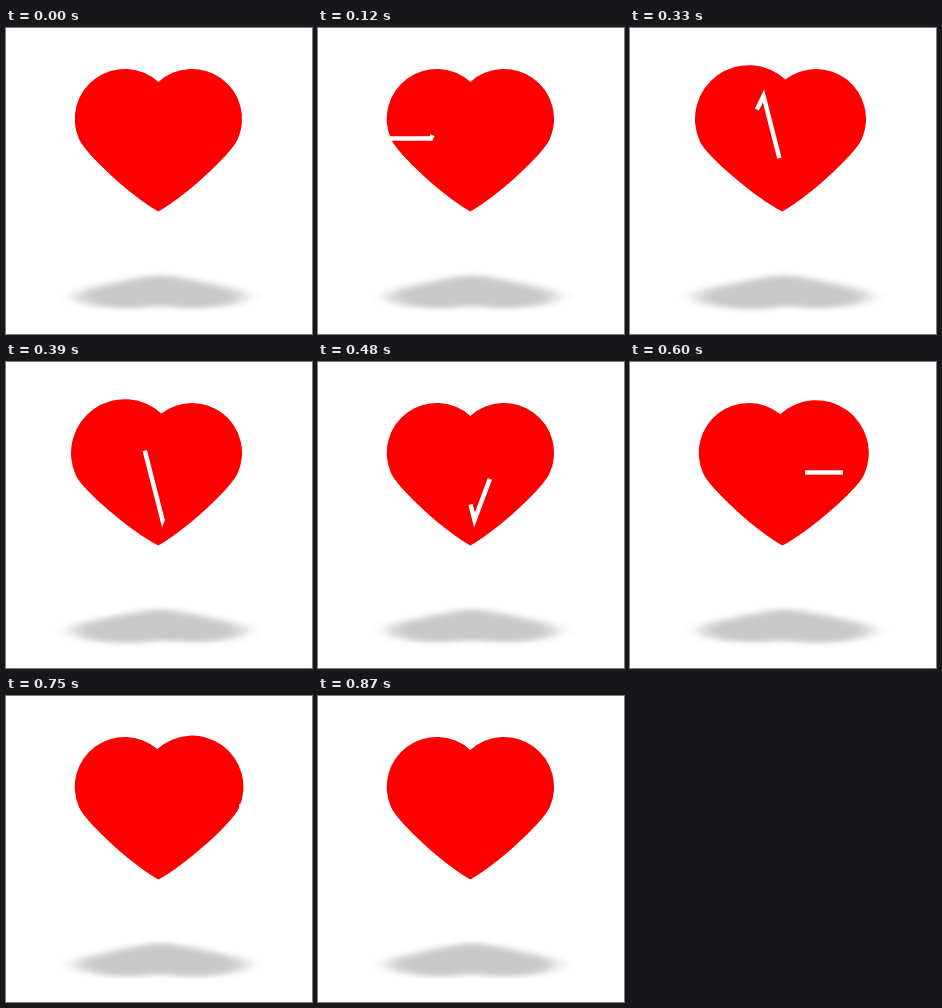
Recreate the animation shown at these times as an HTML page. Size 306x306 px, loop 0.9 s.

```html
<!DOCTYPE html>
<html lang="en">
<head>
<meta charset="utf-8">
<title>Heartbeat</title>
<style>
  html, body { margin: 0; width: 100%; height: 100%; overflow: hidden; background: #fff; }
  svg { display: block; width: 100%; height: 100%; }
</style>
</head>
<body>
<svg viewBox="0 0 306 306">
  <defs>
    <path id="heart"/>
    <filter id="soft" filterUnits="userSpaceOnUse" x="0" y="220" width="306" height="86" color-interpolation-filters="sRGB">
      <feGaussianBlur stdDeviation="10 2.5"/>
    </filter>
  </defs>
  <g filter="url(#soft)">
    <use href="#heart" fill="#c8c8c8" transform="translate(2 290) scale(1 -.237)"/>
  </g>
  <use href="#heart" fill="#f00"/>
  <path id="trace" fill="none" stroke="#fff" stroke-width="4.5" stroke-miterlimit="10"
        d="M53 110.4H113L133.5 68L156.5 158L174.3 110.4H260"/>
</svg>
<script>
  const LOOP = 900, STEP = 30;
  const heart = document.getElementById('heart');
  const trace = document.getElementById('trace');

  // Sine ease around a midpoint: distance along the trace at time t
  const glide = (t, mid, span, centre, reach) =>
    Math.max(0, centre + reach * Math.sin(Math.PI * (t - mid) / span));
  const tail = t => glide(t, 420, 900, 147, 178);
  const head = t => glide(t, 270, 1120, 140, 187);

  // Lobe radius: swells and shrinks back at a steady rate
  const lobe = (t, peak, swell) => 50 + swell * Math.max(0, 1 - Math.abs(t - peak) / 120);

  function heartPath(rl, rr) {
    const xl = 118.8, xr = 186, y = 91, tipX = 152.4, tipY = 183.5;
    const gap = xr - xl;
    const dx = (gap * gap + rl * rl - rr * rr) / (2 * gap);
    const notch = `${xl + dx} ${y - Math.sqrt(rl * rl - dx * dx)}`;

    // Each side leaves its lobe along the tangent and bends in to the tip
    const cos = 0.914, sin = 0.407, handle = 17;
    const side = (x, r, dir) => {
      const px = x + dir * r * cos, py = y + r * sin;
      return {
        start: `${px} ${py}`,
        bend: `${px - dir * handle * sin} ${py + handle * cos}`,
        low: `${tipX + 0.32 * (px - tipX)} ${tipY + 0.19 * (py - tipY)}`
      };
    };
    const l = side(xl, rl, -1), r = side(xr, rr, 1);
    return `M${tipX} ${tipY}C${l.low} ${l.bend} ${l.start}` +
      `A${rl} ${rl} 0 0 1 ${notch}A${rr} ${rr} 0 0 1 ${r.start}` +
      `C${r.bend} ${r.low} ${tipX} ${tipY}Z`;
  }

  function draw(now) {
    const t = Math.floor((now % LOOP) / STEP) * STEP;
    heart.setAttribute('d', heartPath(lobe(t, 360, 5), lobe(t, 660, 5.5)));
    const a = tail(t), b = head(t);
    trace.setAttribute('stroke-dasharray', `${Math.max(0, b - a)} 999`);
    trace.setAttribute('stroke-dashoffset', -a);
  }

  const start = performance.now();
  function frame() {
    draw(performance.now() - start);
    requestAnimationFrame(frame);
  }
  frame();
</script>
</body>
</html>
```
